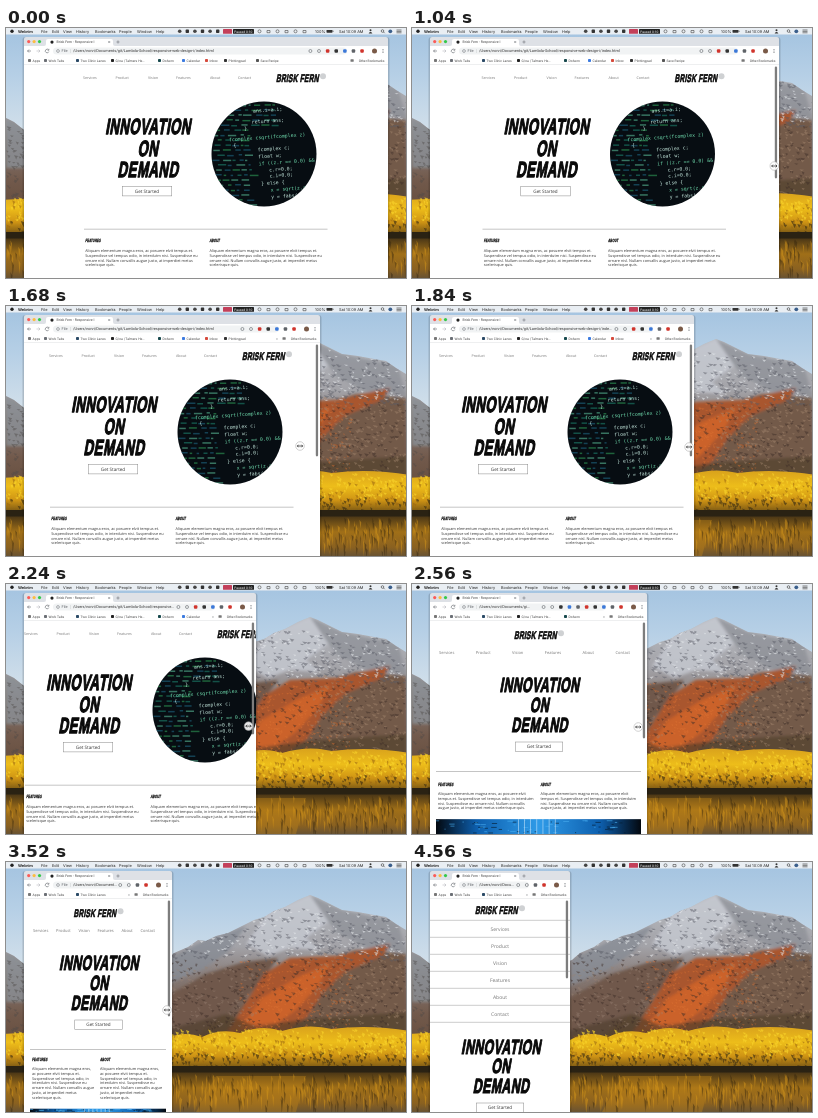
An HTML page for the animation above (4.64 s loop, 400 by 250 pixels).

```html
<!DOCTYPE html>
<html lang="en">
<head>
<meta charset="utf-8">
<title>Responsive page resize</title>
<style>
  html, body { margin: 0; width: 100%; height: 100%; overflow: hidden; background: #fff; }
  svg { display: block; width: 100vw; height: 100vh; }
  text { font-family: "Open Sans", "Noto Sans", sans-serif; white-space: pre; text-rendering: geometricPrecision; }
  .ui { font-family: Roboto, Inter, sans-serif; }
  .menu { font-family: Inter, Roboto, sans-serif; font-size: 3.9px; fill: #222; }
  .comic { font-family: "Liberation Sans", Arial, sans-serif; font-weight: 700; fill: #0a0a0a; stroke: #0a0a0a; stroke-linejoin: round; }
  .code { font-family: "DejaVu Sans Mono", monospace; }
</style>
</head>
<body>
<svg viewBox="0 0 400 250" preserveAspectRatio="none">
  <defs>
    <linearGradient id="sky" x2="0" y2="1">
      <stop stop-color="#a3c3e0"/><stop offset=".2" stop-color="#b7d0e6"/><stop offset=".42" stop-color="#d3e0ea"/>
    </linearGradient>
    <linearGradient id="rock" x2="0" y2="1">
      <stop stop-color="#b9bcc2"/><stop offset=".28" stop-color="#a3a3a8"/>
      <stop offset=".45" stop-color="#867a76"/><stop offset=".65" stop-color="#725a4c"/><stop offset="1" stop-color="#58402f"/>
    </linearGradient>
    <linearGradient id="trees" x2="0" y2="1">
      <stop stop-color="#d9a21c"/><stop offset=".35" stop-color="#edbd1a"/>
      <stop offset=".65" stop-color="#cf9414"/><stop offset="1" stop-color="#5a4115"/>
    </linearGradient>
    <linearGradient id="water" x2="0" y2="1">
      <stop stop-color="#4b3716"/><stop offset=".35" stop-color="#a06f18"/>
      <stop offset=".7" stop-color="#8a6120"/><stop offset="1" stop-color="#574b3c"/>
    </linearGradient>
    <linearGradient id="strip">
      <stop stop-color="#03080f"/><stop offset=".2" stop-color="#0d5fae"/><stop offset=".5" stop-color="#2f9be8"/>
      <stop offset=".8" stop-color="#0d5fae"/><stop offset="1" stop-color="#03080f"/>
    </linearGradient>
    <filter id="soft"><feGaussianBlur stdDeviation="1.6"/></filter>
    <filter id="haze"><feGaussianBlur stdDeviation=".5"/></filter>
    <clipPath id="disc"><circle r="52.5"/></clipPath>
    <clipPath id="ridge"><path id="hill"/></clipPath>
    <clipPath id="pane"><rect id="paneBox" x="18" y="9" height="241"/></clipPath>
    <g id="photo" clip-path="url(#disc)"></g>
  </defs>
  <g id="wall"></g>
  <g id="bar"></g>
  <g id="win"></g>
</svg>
<script>
const LOOP = 4640, STEP = 80, LEFT = 18;
const $ = id => document.getElementById(id);

// right edge of the window over time
const edge = [[0, 382], [320, 380], [720, 373], [800, 373], [1040, 367], [1360, 352], [1520, 330],
  [1600, 330], [1840, 282], [1920, 279], [2160, 256], [2400, 238], [2480, 238], [2560, 235], [2800, 214],
  [2880, 214], [3040, 198], [3120, 198], [3280, 181], [3360, 181], [3520, 166], [3600, 158]];
const grip = [[0, 138], [1360, 138], [1840, 141], [2560, 143], [3520, 148]];

function at(keys, t) {
  const i = keys.findIndex(k => k[0] > t);
  if (i < 0) return keys[keys.length - 1][1];
  const [t0, a] = keys[i - 1], [t1, b] = keys[i];
  return a + (b - a) * (t - t0) / (t1 - t0);
}

let seed = 7;
const rnd = (a = 0, b = 1) => {
  seed = (seed * 16807) % 2147483647;
  return a + (b - a) * seed / 2147483647;
};

const rect = (x, y, w, h, fill, more = '') =>
  `<rect x="${x}" y="${y}" width="${w}" height="${h}" fill="${fill}" ${more}/>`;
const dot = (x, y, r, fill, more = '') => `<circle cx="${x}" cy="${y}" r="${r}" fill="${fill}" ${more}/>`;
const line = (d, color, w = .5) => `<path d="${d}" fill="none" stroke="${color}" stroke-width="${w}"/>`;
const shape = (d, fill, more = '') => `<path d="${d}" fill="${fill}" ${more}/>`;
const text = (x, y, s, size, fill, more = '') =>
  `<text x="${x}" y="${y}" font-size="${size}" fill="${fill}" ${more}>${s}</text>`;
const MID = 'text-anchor="middle"';

// slanted condensed display lettering; y is the middle of the capitals
const comic = (x, y, s, size, anchor = 'start') =>
  `<text class="comic" transform="translate(${x} ${y + size * .36}) skewX(-10) scale(.6 1)" font-size="${size}"
    letter-spacing="${size * .036}" stroke-width="${size * .06}" text-anchor="${anchor}">${s}</text>`;

const pen = document.createElement('canvas').getContext('2d');
function width(s, size, family = '"Open Sans", sans-serif') {
  pen.font = `100px ${family}`;
  return pen.measureText(s).width * size / 100;
}

function wrap(s, size, max) {
  const rows = [];
  let row = '';
  for (const word of s.split(' ')) {
    const next = row ? row + ' ' + word : word;
    if (row && width(next, size) > max) { rows.push(row); row = word; } else row = next;
  }
  return [...rows, row];
}

// small slanted patches scattered over an area
function flecks(n, [x0, x1], [y0, y1], w, h, fill, alpha = .5) {
  let d = '';
  for (let i = 0; i < n; i++) {
    const a = rnd(.4, 1) * w, b = rnd(.4, 1) * h;
    d += `M${rnd(x0, x1).toFixed(1)} ${rnd(y0, y1).toFixed(1)}l${a.toFixed(1)} ${(b * .4).toFixed(1)}l${(-a * .5).toFixed(1)} ${b.toFixed(1)}z`;
  }
  return shape(d, fill, `opacity="${alpha}"`);
}

function drawWall() {
  $('hill').setAttribute('d', 'M0 90L8 94L18 102L60 118L120 112L160 98L168 91L182 85L192 78L200 79L210 74L222 71L236 64L248 58L258 55L268 49L279 45L292 38L304 33L312 36L324 42L336 48L352 50L368 53L380 55L390 62L400 68V215H0Z');
  const X = [0, 400];
  let s = rect(0, 0, 400, 250, 'url(#sky)');
  s += '<g clip-path="url(#ridge)">' + rect(0, 33, 400, 182, 'url(#rock)') + '<g filter="url(#soft)">'
    + shape('M304 33L322 60L300 76L314 88L284 86L262 94L240 82L262 51Z', '#c6cad1', 'opacity=".8"')
    + shape('M304 33L336 48L392 60L400 90L362 86L330 70Z', '#8b8d95', 'opacity=".7"')
    + shape('M160 98L200 78L240 64L222 90L196 108L158 124Z', '#888c95', 'opacity=".8"')
    + shape('M0 90L20 102V140H0Z', '#8a8e95', 'opacity=".8"')
    + shape('M158 136L200 112L238 100L272 96L250 126L222 150L180 180H158Z', '#6f584b')
    + shape('M312 100L350 88L400 92V180H290L302 136Z', '#735a49')
    + shape('M220 172L244 134L258 112L284 96L330 94L384 82L376 94L338 110L316 132L300 156L276 172Z', '#a9562f')
    + shape('M234 166L256 136L290 116L324 102L312 124L290 148L262 168Z', '#d2642a', 'opacity=".85"')
    + shape('M158 168L220 152L250 164L310 156L400 150V180H158Z', '#4d3d2a', 'opacity=".6"')
    + '</g><g filter="url(#haze)">'
    + flecks(330, [160, 400], [46, 98], 6, 2.6, '#5b5d67')
    + flecks(230, [180, 396], [42, 94], 5, 2, '#e6e9ed', .6)
    + flecks(380, [158, 400], [96, 170], 5, 2.6, '#3f2f28')
    + flecks(260, [232, 344], [98, 166], 4, 2, '#de7433', .45)
    + flecks(190, [300, 400], [90, 165], 5, 2.4, '#a48870', .45)
    + flecks(120, [158, 250], [104, 165], 5, 2.4, '#9a8273', .4)
    + flecks(70, [0, 24], [98, 168], 5, 2.6, '#4f4a48', .45)
    + '</g></g><g filter="url(#haze)">'
    + shape('M-4 172Q80 166 158 178Q176 168 196 175Q214 166 234 171Q256 162 276 169Q302 161 326 167Q362 162 404 169V210H-4Z', 'url(#trees)')
    + flecks(420, X, [167, 192], 4, 3.4, '#f8d32a', .7)
    + flecks(260, X, [172, 200], 4, 4, '#9a6412', .55)
    + flecks(260, X, [190, 206], 4, 4, '#3d2e13', .65)
    + rect(-4, 204, 408, 8, '#2a2213')
    + rect(-4, 210.5, 408, 44, 'url(#water)')
    + shape('M190 250L210 214H300L290 250Z', '#c98a18', 'opacity=".35"')
    + flecks(240, X, [211, 236], 2.4, 14, '#d7981b', .5)
    + flecks(200, X, [211, 245], 2.4, 12, '#30230f', .45) + '</g>';
  $('wall').innerHTML = s;
}

function drawPhoto() {
  let s = rect(-53, -53, 106, 106, '#070d12');
  const tones = ['#1c7f6c', '#2e9b58', '#1d647f', '#57b894'];
  for (let y = -50; y < 52; y += 5) {
    for (let x = -52 + rnd(0, 8); x < (y < -25 ? 10 : -14);) {
      const w = rnd(2, 9);
      s += rect(x.toFixed(1), (y + rnd(0, 1)).toFixed(1), w.toFixed(1), 1.5, tones[Math.floor(rnd(0, 4))], 'opacity=".6"');
      x += w + rnd(1, 5);
    }
  }
  const rows = [[-8, -42, 'ans.i=a.i;'], [-10, -31, 'return ans;'], [-18, -25, '}'],
    [-34, -15, 'fcomplex csqrt(fcomplex z)'], [-30, -9, '{'], [-6, -3, 'fcomplex c;'], [-6, 4, 'float w;'],
    [-6, 11, 'if ((z.r == 0.0) &amp;&amp; (z.i'], [4, 18, 'c.r=0.0;'], [4, 24, 'c.i=0.0;'],
    [-5, 31, '} else {'], [4, 38, 'x = sqrt(z.r);'], [4, 45, 'y = fabs(z.i);']];
  s += '<g transform="rotate(-4)">' + rows.map(([x, y, r], i) =>
    text(x, y, r, 4.9, i % 4 == 3 ? '#6fdcae' : '#c3e6dc', 'class="code"')).join('') + '</g>';
  $('photo').innerHTML = s;
}

function drawBar() {
  const items = [[35, 'File'], [46, 'Edit'], [57, 'View'], [70, 'History'], [89, 'Bookmarks'],
    [113, 'People'], [131, 'Window'], [150, 'Help']];
  let s = rect(0, 0, 400, 6.5, '#e9eef3') + dot(6, 3.2, 1.7, '#222')
    + text(12, 4.7, 'Webrim', 3.9, '#111', 'class="menu" font-weight="700"');
  for (const [x, w] of items) s += text(x, 4.7, w, 3.9, '#222', 'class="menu"');
  for (let i = 0; i < 6; i++) {
    const x = 172 + i * 7.6;
    s += i % 2 ? rect(x, 1.6, 3.4, 3.4, '#333', 'rx=".8"') : dot(x + 1.7, 3.3, 1.8, '#444');
  }
  s += rect(217, .9, 9, 4.9, '#c3405a', 'rx=".6"') + rect(227, .9, 21, 4.9, '#222', 'rx=".6"')
    + text(228.2, 4.5, 'Paused 0:10', 3.3, '#fff', 'class="ui"');
  [252, 261, 270, 279, 288, 297].forEach((x, i) => s += i % 2
    ? line(`M${x} 4.7V2.5h3v2.2z`, '#444', .6) : dot(x + 1.5, 3.3, 1.5, 'none', 'stroke="#444" stroke-width=".6"'));
  s += text(309, 4.7, '100%', 3.9, '#222', 'class="menu"')
    + rect(320.5, 1.9, 6, 2.8, '#333', 'rx=".6"') + rect(326.8, 2.7, .6, 1.2, '#333')
    + text(333, 4.7, 'Sat 10:09 AM', 3.9, '#222', 'class="menu"')
    + dot(364.5, 2.3, 1, '#333') + shape('M362.6 5.4Q364.5 2.6 366.4 5.4Z', '#333')
    + dot(376.5, 3, 1.3, 'none', 'stroke="#333" stroke-width=".6"') + line('M377.5 4L378.7 5.2', '#333', .6)
    + dot(384.3, 3.3, 1.9, '#3b5f8c')
    + line('M390.5 2h5M390.5 3.4h5M390.5 4.8h5', '#333', .6);
  $('bar').innerHTML = s;
}

const URL_PATH = '/Users/norvi/Documents/git/Lambda-School/responsive-web-design-i/index.html';
const MARKS = [[22, 'Apps', '#777', 32], [38, 'Work Tabs', '#6b6f75', 62], [70, 'Two Clinic Lanes', '#2b4a66', 102],
  [105, 'G/na | Talmers He…', '#222', 144], [152, 'Dolvern', '#17494d', 171], [176, 'Calendar', '#3c7be0', 196],
  [199, 'Inbox', '#d64a3c', 214], [218, 'Plottingpad', '#333', 246], [250, 'Save Recipe', '#555', 277]];

function frame(R) {
  const W = R - LEFT, grey = '#5f6368';
  let s = rect(LEFT - 1.5, 9, W + 3, 250, '#000', 'opacity=".15" rx="3"')
    + rect(LEFT, 9, W, 245, '#dee1e6', 'rx="2"')
    + ['#fc5b57', '#fdbc40', '#34c84a'].map((c, i) => dot(22.7 + i * 5.4, 13.6, 1.6, c)).join('')
    + shape('M38 18Q40 18 40 16V13Q40 11 42 11H105Q107 11 107 13V16Q107 18 109 18Z', '#fff')
    + dot(46, 14.1, 1.6, '#222')
    + text(50.5, 15.4, 'Brisk Fern - Responsive I', 3.5, '#444', 'class="ui"')
    + line('M102.2 13l2 2m0 -2l-2 2M112 12.4v3.2m-1.6 -1.6h3.2', grey)
    + rect(LEFT, 18, W, 19, '#fff')
    + line('M25 23H21.5l1.5 -1.5m-1.5 1.5l1.5 1.5', grey, .6)
    + line('M30.5 23H34l-1.5 -1.5m1.5 1.5l-1.5 1.5', '#b5b8bc', .6)
    + line('M42.6 22a1.8 1.8 0 1 0 .2 1.6M42.9 20.8v1.4h-1.4', grey, .6)
    + rect(47, 19.4, Math.max(40, R - 88), 7.2, '#f1f3f4', 'rx="3.6"')
    + dot(52, 23, 1.4, 'none', `stroke="${grey}" stroke-width=".5"`)
    + text(55.5, 24.4, 'File', 3.9, grey, 'class="ui"') + line('M64.5 21v4', '#c4c7ca', .4);

  const max = (R > 245 ? R - 81 : R > 200 ? R - 117 : R - 54) - 67;
  let url = URL_PATH;
  const long = u => width(u, 3.9, 'Roboto, sans-serif') > max;
  if (long(url)) {
    while (long(url + '…')) url = url.slice(0, -1);
    url += '…';
  }
  s += text(67, 24.4, url, 3.9, '#333', 'class="ui"');
  const tools = R > 245 ? 7 : R > 200 ? 10 : 4;
  const tint = ['#d0342c', '#5f6368', '#3b78d8', '#333'];
  for (let i = 0; i < tools; i++) {
    const x = R - 26 - i * 8.6;
    s += i < tools - 2 ? rect(x - 1.7, 21.2, 3.5, 3.5, tint[i % 4], 'rx="1"')
      : dot(x, 23, 1.5, 'none', `stroke="${grey}" stroke-width=".6"`);
  }
  s += dot(R - 13.5, 23, 2.5, '#7a5a48') + [21.4, 23, 24.6].map(y => dot(R - 5, y, .5, grey)).join('');

  for (const [x, name, c, end] of MARKS) {
    if (end > R - 43) break;
    s += rect(x, 31, 3, 3, c, 'rx=".8"') + text(x + 4.6, 33.8, name, 3.35, '#444', 'class="ui"');
  }
  if (R < 325) s += text(R - 44, 33.8, '»', 3.8, grey, 'class="ui"');
  s += rect(R - 37.5, 31.2, 3.2, 2.6, '#777', 'rx=".5"')
    + text(R - 3.5, 33.8, 'Other Bookmarks', 3.35, '#444', 'class="ui" text-anchor="end"')
    + rect(LEFT, 36.6, W, .4, '#d5d7da') + rect(LEFT, 37, W, 213, '#fff');
  return s;
}

const NAV = ['Services', 'Product', 'Vision', 'Features', 'About', 'Contact'];
const BODY = 'Aliquam elementum magna eros, ac posuere elvit tempus et. Suspendisse vel tempus odio, in interdutm nisi. Suspendisse eu ornare nisl. Nullam convallis augue justo, at imperdiet metus scelerisque quis.';
const BODY_SIZE = 3.82, LEADING = 4.85;

const logo = (x, y) => comic(x, y, 'BRISK FERN', 11) + dot(x + 47, y - 1.7, 3, '#cfd1d3');
const button = (x, y, w) => rect(x - w / 2, y, w, 9.6, '#fff', 'stroke="#888" stroke-width=".5"')
  + text(x, y + 6.4, 'Get Started', 4.6, '#333', MID);
const hero = (x, y, size, gap) =>
  ['INNOVATION', 'ON', 'DEMAND'].map((w, i) => comic(x, y + i * gap, w, size, 'middle')).join('');

const column = (x, y, title, rows, lead) => comic(x, y, title, 4.6)
  + rows.map((r, i) => text(x, y + lead + 1.4 + i * LEADING, r, BODY_SIZE, '#333')).join('');

function desktop(R) {
  const x = Math.max(LEFT + 1, (LEFT + R) / 2 - 122);
  const spots = [-1, 31.5, 64, 92, 126, 154], rows = wrap(BODY, BODY_SIZE, 119);
  return NAV.map((n, i) => text(x + spots[i], 51, n, 3.65, '#777')).join('')
    + logo(x + 192, 50) + hero(x + 64, 98.5, 22, 21.5) + button(x + 63, 158.3, 49.5)
    + `<use href="#photo" x="${x + 180}" y="126"/>`
    + line(`M${x} 201.2h243.5`, '#888')
    + column(x + 1.2, 212.7, 'FEATURES', rows, 9.8) + column(x + 125.5, 212.7, 'ABOUT', rows, 9.8);
}

function strip(x, y, w) {
  let s = rect(x, y, w, 250 - y, 'url(#strip)');
  seed = 31;
  for (let i = 0; i < 60; i++) {
    s += rect(x + w * rnd(0, .94), rnd(y, 250), rnd(1, 6), 1, i % 2 ? '#06192c' : '#48b0f2', 'opacity=".6"');
  }
  for (let i = 0; i < 7; i++) s += rect(x + w * (.4 + i * .03), y, .7, 250 - y, '#e2f3ff', 'opacity=".7"');
  return s;
}

function tablet(R) {
  const mid = (LEFT + R) / 2, size = 4.05, end = R - 6;
  const sizes = NAV.map(n => width(n, size));
  const gap = (R - 44 - sizes.reduce((a, b) => a + b)) / 5;
  let x = 27, s = logo(mid - 24.5, 51);
  NAV.forEach((n, i) => { s += text(x, 70.4, n, size, '#777'); x += sizes[i] + gap; });
  const y = 197 + (R - 166) / 23, col = (end - 24) / 2, rows = wrap(BODY, BODY_SIZE, col - 4.5);
  s += hero(mid + 1, 101, 20.5, 19.6) + button(mid + .5, 158, 47.5) + line(`M24 187.5H${end}`, '#888')
    + column(26, y, 'FEATURES', rows, 9.5) + column(26 + col, y, 'ABOUT', rows, 9.5);
  const top = y + 20.6 + (rows.length - 1) * LEADING;
  return top < 250 ? s + strip(24, top, end - 24) : s;
}

function mobile(R) {
  const mid = (LEFT + R) / 2;
  let s = logo(mid - 25, 48) + line(`M${LEFT} 58.3H${R}`, '#999');
  NAV.forEach((n, i) => {
    const y = 67 + i * 17;
    s += text(mid, y + 1.9, n, 5, '#777', MID) + line(`M${LEFT} ${y + 8.3}H${R}`, '#999');
  });
  return s + hero(mid + 1, 184.5, 20.5, 19.5) + button(mid, 241, 47.5);
}

function pointer(t) {
  if (t < 80 || t >= 4560) return '';
  if (t >= 4000) {
    const k = (t - 3920) / 640, e = k * k * (3 - 2 * k);
    return shape('M0 0V5.6L1.4 4.4L2.3 6.4L3.2 6L2.3 4.1H4Z', '#111',
      `stroke="#fff" stroke-width=".4" transform="translate(${160 + 62 * e} ${148 - 144 * e})"`);
  }
  const x = Math.max(161, at(edge, t + 100)), y = at(grip, t);
  return `<g transform="translate(${x} ${y})">` + dot(0, 0, 4.3, '#fff', 'stroke="#aaa" stroke-width=".6" opacity=".9"')
    + line('M-2.7 0H2.7M-1.4 -1.3L-2.7 0L-1.4 1.3M1.4 -1.3L2.7 0L1.4 1.3', '#222', .7) + '</g>';
}

function draw(t) {
  const R = at(edge, t);
  const [page, thumb] = R > 240 ? [desktop, 112] : R > 160 ? [tablet, 116] : [mobile, 78];
  $('paneBox').setAttribute('width', R - LEFT);
  $('win').innerHTML = frame(R) + `<g clip-path="url(#pane)">${page(R)}</g>`
    + (t ? rect(R - 4.2, 38.5, 2.3, thumb, '#7d7d7d', 'rx="1.15"') : '') + pointer(t);
}

drawWall();
drawPhoto();
drawBar();
const start = performance.now();
let shown = -1;
function tick() {
  const t = Math.floor((performance.now() - start) % LOOP / STEP) * STEP;
  if (t !== shown) draw(shown = t);
  requestAnimationFrame(tick);
}
tick();
</script>
</body>
</html>
```
